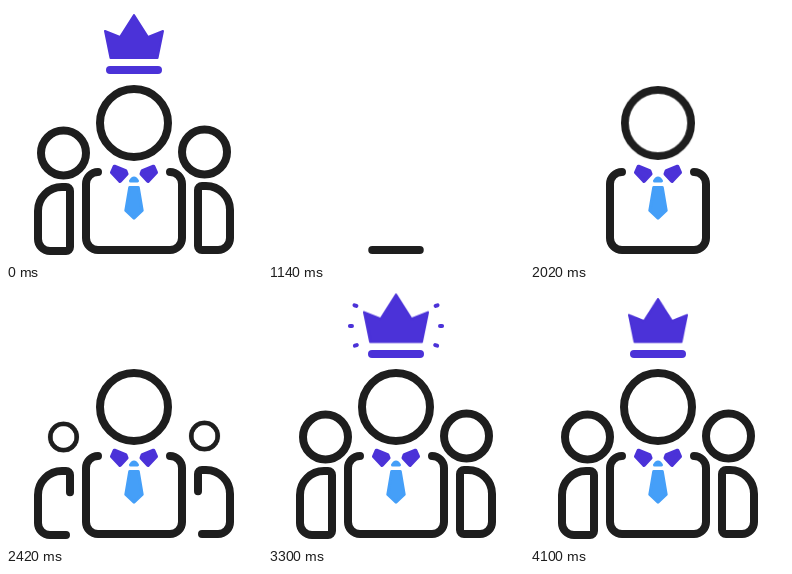
Animation, 256 px wide and 256 px high, one loop 4600 ms. Source, as an HTML page:

```html
<!DOCTYPE html>
<html lang="en">
<head>
<meta charset="utf-8">
<title>Team leader</title>
<style>
  html, body { margin: 0; width: 100%; height: 100%; overflow: hidden; background: #fff; }
  svg { display: block; width: 100vw; height: 100vh; }

  .ink { fill: none; stroke: #1e1e1e; stroke-width: 8; stroke-linecap: round; stroke-linejoin: round; }
  .violet { fill: #4b32d8; stroke: #4b32d8; stroke-linecap: round; stroke-linejoin: round; }
  .blue { fill: #459ff8; stroke: #459ff8; stroke-width: 3; stroke-linejoin: round; }

  /* The cycle builds from blank; the delay starts it on the finished picture. */
  .torso, .side-torso, .head, .side-head, .tie, .bar, .crown, .ray {
    animation: 4600ms linear -4100ms infinite;
  }
  .torso, .side-torso { stroke-dasharray: 1 3; }
  .torso { animation-name: draw-torso; }
  .side-torso { animation-name: draw-side; }
  .head { animation-name: grow-head; transform-origin: 128px 117px; }
  .side-head { animation-name: grow-side; transform-origin: 57.5px 147px; }
  .tie { animation-name: grow-tie; transform-origin: 128px 158px; }
  .bar { animation-name: widen; stroke-width: 8; }
  .crown { animation-name: crown; transform-origin: 128px 53px; stroke-width: 2; }
  .ray { animation-name: burst; stroke-width: 4; fill: none; }

  @keyframes draw-torso {
    0%, 9.8% { stroke-dashoffset: 1.1; animation-timing-function: ease-in-out; }
    21.5%, 100% { stroke-dashoffset: 0; }
  }
  @keyframes draw-side {
    0%, 34.4% { stroke-dashoffset: 1.1; animation-timing-function: ease-in-out; }
    45.5%, 100% { stroke-dashoffset: 0; }
  }
  @keyframes grow-head {
    0%, 20.8% { transform: scale(0); }
    23.48% { transform: scale(.9); animation-timing-function: ease-out; }
    33% { transform: scale(.974); }
    38%, 100% { transform: scale(1); }
  }
  @keyframes grow-side {
    0%, 40% { transform: scale(0); }
    42.7% { transform: scale(.9); animation-timing-function: ease-out; }
    47.5%, 100% { transform: scale(1); }
  }
  @keyframes grow-tie {
    0%, 21.4% { transform: scale(0); }
    23.48% { transform: scale(.73); animation-timing-function: ease-out; }
    32%, 100% { transform: scale(1); }
  }
  @keyframes widen {
    0%, 45.5% { stroke-dasharray: 0 99; stroke-dashoffset: -24; opacity: 0; }
    45.6% { stroke-dasharray: 0 99; stroke-dashoffset: -24; opacity: 1; }
    47.83% { stroke-dasharray: 10 99; stroke-dashoffset: -19; opacity: 1; animation-timing-function: ease-out; }
    54.5%, 100% { stroke-dasharray: 48 99; stroke-dashoffset: 0; opacity: 1; }
  }
  @keyframes crown {
    0%, 47.4% { transform: scale(0); }
    47.83% { transform: scale(.03); animation-timing-function: ease-out; }
    58% { transform: scale(1.09); }
    60.87% { transform: scale(1.1); animation-timing-function: ease-in-out; }
    70.6% { transform: scale(1.06); animation-timing-function: ease-out; }
    78.2%, 100% { transform: scale(1); }
  }
  @keyframes burst {
    0%, 59% { stroke-dasharray: 0 99; stroke-dashoffset: 0; opacity: 0; }
    59.1% { stroke-dasharray: 0 99; stroke-dashoffset: 0; opacity: 1; }
    60.87% { stroke-dasharray: 2 99; stroke-dashoffset: -4; opacity: 1; }
    64.3% { stroke-dasharray: 7 99; stroke-dashoffset: -9; opacity: 1; }
    70.3% { stroke-dasharray: 0 99; stroke-dashoffset: -20; opacity: 1; }
    70.4%, 100% { stroke-dasharray: 0 99; stroke-dashoffset: -20; opacity: 0; }
  }
</style>
</head>
<body>
<svg viewBox="0 0 256 256">
  <g class="ink" data-mirror="-1">
    <path class="side-torso" pathLength="1"
      d="M60 245H44A12 12 0 0 1 32 233V205A24 24 0 0 1 56 181H60A4 4 0 0 1 64 185V241A4 4 0 0 1 60 245Z"/>
    <circle class="side-head" cx="57.5" cy="147" r="22.5"/>
  </g>

  <g class="ink" data-mirror="0">
    <path class="torso" pathLength="1" d="M128 244H92A12 12 0 0 1 80 232V178A12 12 0 0 1 92 166"/>
  </g>
  <circle class="ink head" cx="128" cy="117" r="34"/>

  <g class="tie">
    <g class="violet" data-mirror="0">
      <path stroke-width="4" d="M108.500 160.700L119.500 165.200L120.500 168L114 175L106 166.500Z"/>
    </g>
    <path class="blue" d="M124.500 175Q126 172 128 172T131.500 175Z"/>
    <path class="blue" d="M123.700 181.500H132.300L136.200 204.500L128 212.200L119.800 204.500Z"/>
  </g>

  <path class="violet bar" d="M104 64H152"/>
  <path class="violet crown" d="M104.500 52L99 25L114 31L128 9L142 31L157 25L151.500 52Z"/>
  <g class="violet" data-mirror="0">
    <path class="ray" d="M92.200 17.300L66 8"/>
    <path class="ray" d="M88 36H60"/>
    <path class="ray" d="M92.700 54L66 61.500"/>
  </g>
</svg>
<script>
  // Reflect each left-hand group about x = 128, shifted down by its data-mirror value.
  for (const left of document.querySelectorAll('[data-mirror]')) {
    const right = left.cloneNode(true);
    right.removeAttribute('data-mirror');
    right.setAttribute('transform', `matrix(-1 0 0 1 256 ${left.dataset.mirror})`);
    left.after(right);
  }
</script>
</body>
</html>
```
